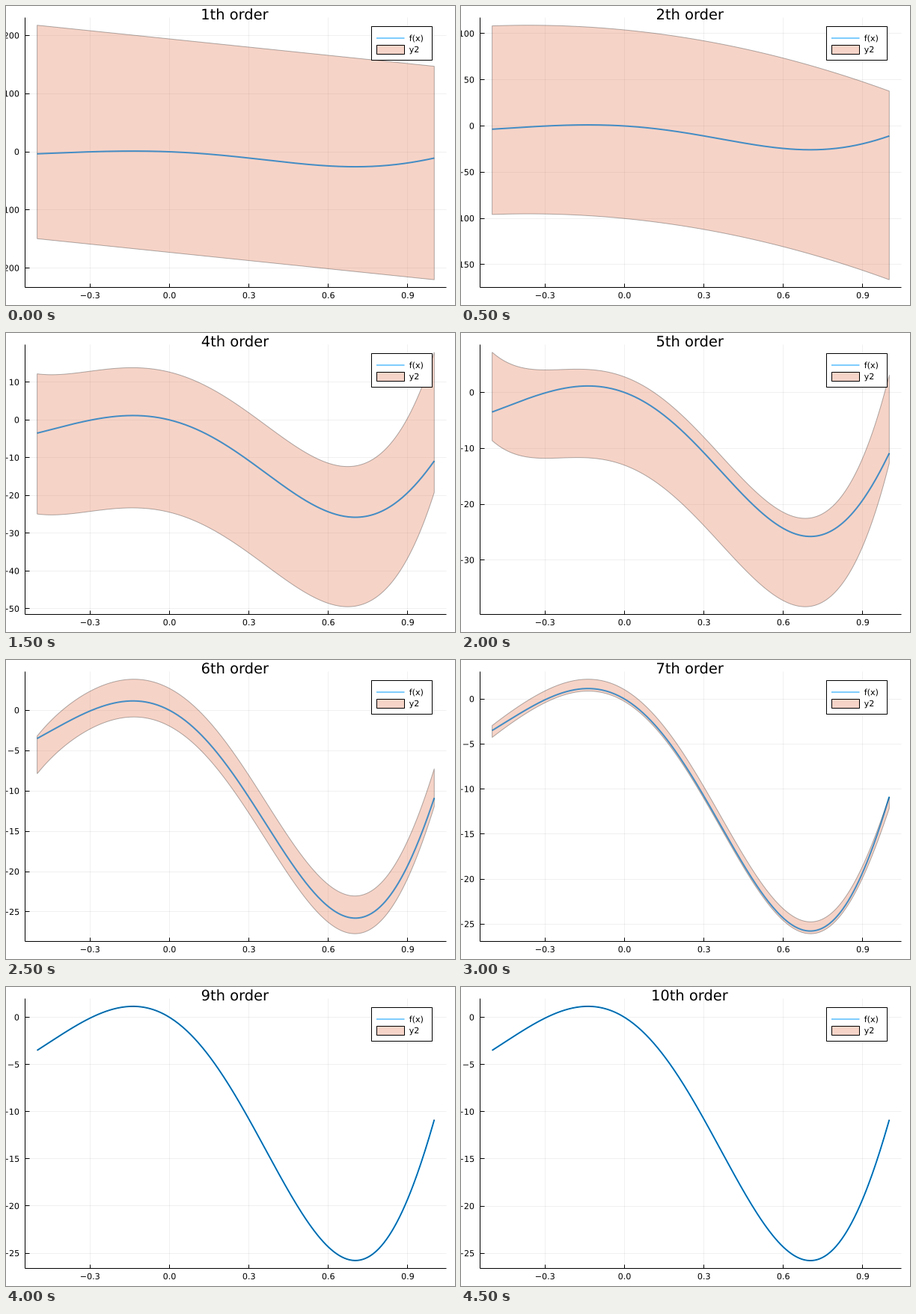
These frames come from a looping animation (600x400 px, 5 s). A matplotlib script:

```python
import math
import numpy as np
import matplotlib.pyplot as plt
from matplotlib.animation import FuncAnimation
from matplotlib.patches import PathPatch, Polygon, Rectangle
from matplotlib.textpath import TextPath
from matplotlib.transforms import Affine2D

W, H, DPI = 600, 400, 100
PX = 72 / DPI
LEFT, RIGHT, TOP, BOTTOM = 25.7, 588.2, 15.5, 376.4
X_MIN, X_MAX, X0 = -0.5, 1.0, 0.25
D = (X_MIN - X0, X_MAX - X0)
BLUE, ORANGE = "#009AFA", "#E36F47"

plt.rcParams["font.family"] = "DejaVu Sans"


# Interval arithmetic on (lo, hi) pairs
def add(*parts):
    return sum(p[0] for p in parts), sum(p[1] for p in parts)


def mul(a, b):
    ends = [p * q for p in a for q in b]
    return min(ends), max(ends)


def power(a, n):
    lo, hi = sorted((a[0] ** n, a[1] ** n))
    return (0.0, hi) if n % 2 == 0 and a[0] < 0 < a[1] else (lo, hi)


def horner(coefs, t):
    total = (0.0, 0.0)
    for c in reversed(coefs):
        total = add(mul(total, t), (c, c))
    return total


def bound(coefs):
    """Range of a polynomial over D, even and odd powers apart."""
    d2 = power(D, 2)
    return add(horner(coefs[0::2], d2), mul(horner(coefs[1::2], d2), D))


# A Taylor model is (coefficients, remainder interval)
def tm_mul(a, b, n):
    full = np.convolve(a[0], b[0])
    tail = full.copy()
    tail[:n + 1] = 0
    rem = add(bound(tail), mul(bound(b[0]), a[1]),
              mul(bound(a[0]), b[1]), mul(a[1], b[1]))
    return full[:n + 1], rem


def tm_sine(n):
    """Model of sin(1.7 x + 0.5)."""
    mid = 1.7 * X0 + 0.5
    t = (1.7 * D[0], 1.7 * D[1])
    coefs = np.array([math.sin(mid + k * math.pi / 2) * 1.7 ** k / math.factorial(k)
                      for k in range(n + 1)])
    angles = np.linspace(mid + t[0], mid + t[1], 20001)
    slope = np.sin(angles + (n + 1) * math.pi / 2) / math.factorial(n + 1)
    return coefs, mul((slope.min(), slope.max()), power(t, n + 1))


SHIFTS = (0, -1.1, 2, 2.2, 2.5, 3)


def f(x):
    return np.prod([x + s for s in SHIFTS], axis=0) * np.sin(1.7 * x + 0.5)


def taylor_model(n):
    def linear(s):
        coefs = np.zeros(n + 1)
        coefs[:2] = X0 + s, 1
        return coefs, (0.0, 0.0)

    model = linear(SHIFTS[0])
    for s in SHIFTS[1:]:
        model = tm_mul(model, linear(s), n)
    return tm_mul(model, tm_sine(n), n)


def tick_values(lo, hi):
    for step in (5, 10, 25, 50, 100):
        ticks = np.arange(math.ceil(lo / step), math.floor(hi / step) + 1) * step
        if len(ticks) <= 7:
            break
    return ticks


def minus(text):
    return text.replace("-", "\u2212")


xs = np.linspace(X_MIN, X_MAX, 301)
ys = f(xs)
margin = 0.03 * (X_MAX - X_MIN)


def to_px(x):
    return LEFT + (x - X_MIN + margin) / (X_MAX - X_MIN + 2 * margin) * (RIGHT - LEFT)


fig = plt.figure(figsize=(W / DPI, H / DPI), dpi=DPI, facecolor="white")
ax = fig.add_axes([0, 0, 1, 1])


def line(x, y, color="black", width=1, **kw):
    ax.plot(x, y, color=color, lw=width * PX, solid_capstyle="butt", **kw)


def rule(x, y, **kw):
    """One-pixel line filling the pixels that hold its ends."""
    line(np.floor(x) + 0.1, np.floor(y) + 0.1, snap=True, **kw)


def box(x, y, w, h, fill, z):
    ax.add_patch(Rectangle((x + 0.1, y + 0.1), w, h, fc=fill, ec="black",
                           lw=PX, zorder=z, snap=True))


def label(x, y, text, size=8, align=0.5):
    """Text on baseline y; align 0, 0.5, 1 puts its left, middle, right at x."""
    path = TextPath((0, 0), text, size=size / PX)
    ext = path.get_extents()
    shift = x - ext.x0 - align * ext.width
    place = Affine2D().scale(1, -1).translate(shift, y)
    ax.add_patch(PathPatch(place.transform_path(path), fc="black", lw=0,
                           zorder=7, snap=False))


def draw_legend():
    box(488, 27, 81, 45, "white", 5)
    line([495, 532.5], [43, 43], BLUE, zorder=6, snap=False)
    box(495, 52, 37, 12, "#F7D4C8", 6)
    label(539, 47, "f(x)", align=0)
    label(539, 62, "y2", align=0)


def draw(i):
    n = i + 1
    coefs, (rem_lo, rem_hi) = taylor_model(n)
    poly = np.polyval(coefs[::-1], xs - X0)
    low, high = poly + rem_lo, poly + rem_hi
    y_lo, y_hi = min(low.min(), ys.min()), max(high.max(), ys.max())
    pad = 0.03 * (y_hi - y_lo)
    y_lo, y_hi = y_lo - pad, y_hi + pad

    def to_py(y):
        return BOTTOM - (y - y_lo) / (y_hi - y_lo) * (BOTTOM - TOP)

    ax.clear()
    ax.set(xlim=(0, W), ylim=(H, 0))
    ax.axis("off")

    for t in (-0.3, 0.0, 0.3, 0.6, 0.9):
        x = to_px(t)
        rule([x, x], [TOP, BOTTOM], alpha=0.06, zorder=1)
        rule([x, x], [BOTTOM, BOTTOM - 5], zorder=4)
        label(x, 391, minus(f"{t:.1f}"))
    for t in tick_values(y_lo, y_hi):
        y = to_py(t)
        rule([LEFT, RIGHT], [y, y], alpha=0.06, zorder=1)
        rule([LEFT, LEFT + 6], [y, y], zorder=4)
        label(17.2, y + 4, minus(str(t)), align=1)
    rule([LEFT, LEFT], [TOP, BOTTOM], zorder=4)
    rule([LEFT, RIGHT], [BOTTOM, BOTTOM], zorder=4)

    px = to_px(xs)
    line(px, to_py(ys), BLUE, 2, zorder=2)
    band = np.column_stack([np.r_[px, px[::-1]], to_py(np.r_[low, high[::-1]])])
    ax.add_patch(Polygon(band, fc=ORANGE, ec="none", alpha=0.3, zorder=3))
    ax.add_patch(Polygon(band, fc="none", ec="black", alpha=0.3, lw=PX, zorder=3.1))

    draw_legend()
    label((LEFT + RIGHT) / 2 - 0.5, 18, f"{n}th order", size=14)
    return []


anim = FuncAnimation(fig, draw, frames=10, interval=500, repeat=True,
                     repeat_delay=0, init_func=lambda: [])
plt.show()
```
